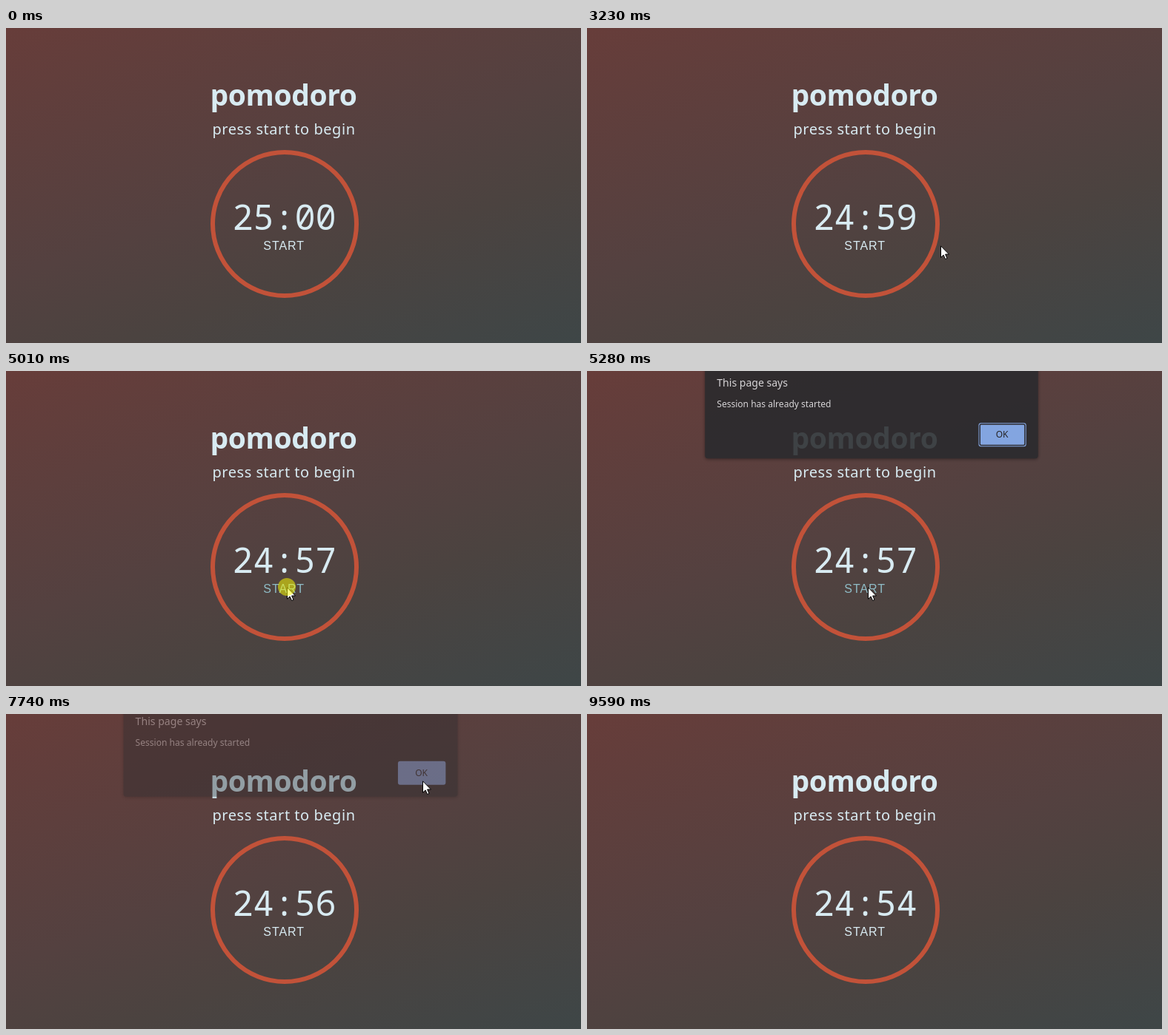
An HTML page for the animation above (9950 ms loop, 776 px wide and 426 px high).

```html
<!DOCTYPE html>
<html lang="en">
<head>
<meta charset="utf-8">
<title>pomodoro</title>
<style>
  html, body { margin: 0; width: 100%; height: 100%; overflow: hidden; }
  body {
    background: linear-gradient(160deg, #673d3a, #544140 48%, #4b4340 68%, #3e4647);
  }
  svg { display: block; width: 776px; height: 426px; }
  text { fill: #d8ebf2; font-family: "Noto Sans", "Open Sans", sans-serif; }
  .title { font-size: 39px; font-weight: 700; letter-spacing: -.4px; }
  .sub { font-size: 20px; letter-spacing: .53px; }
  .clock {
    font: 47px "Noto Sans Mono", "DejaVu Sans Mono", monospace;
    letter-spacing: -.2px;
  }
  .start { font: 16px "Liberation Sans", Arial, sans-serif; letter-spacing: .95px; }
  .dialog text { fill: #e8eaed; }
  .dialog .ok { fill: #202124; font-size: 12px; }
  .panel { filter: drop-shadow(0 1px 2px rgba(0, 0, 0, .45)); }
</style>
</head>
<body>
<svg viewBox="0 0 776 426">
  <text class="title" x="275.5" y="105">pomodoro</text>
  <text class="sub" x="278.5" y="144">press start to begin</text>
  <circle cx="376" cy="265" r="97" fill="none" stroke="#c25239" stroke-width="6"/>
  <text class="clock" id="clock" x="375.5" y="273" text-anchor="middle">25:00</text>
  <text class="start" id="start" x="347.3" y="300">START</text>

  <g class="dialog" id="dialog">
    <rect class="panel" x="160" y="-40" width="448" height="165" rx="4" fill="#292a2d"/>
    <text x="176" y="28" font-size="14">This page says</text>
    <text x="176" y="56" font-size="12">Session has already started</text>
    <rect id="button" x="528" y="77" width="64" height="32" rx="3" fill="#8ab4f8"/>
    <rect id="ring" x="529.75" y="78.75" width="60.5" height="28.5" rx="2"
          fill="none" stroke="#292a2d" stroke-width="1.5"/>
    <text class="ok" x="559.5" y="97" text-anchor="middle">OK</text>
  </g>

  <path id="cursor" d="M.5 .8V16.3L4.1 12.9 6.6 18.5 9 17.5 6.6 12H11.5Z"
        fill="#fff" stroke="#000"/>
  <circle id="ripple" r="12" fill="#ff0" fill-opacity=".52"/>
</svg>

<script>
const LOOP = 9950;
const $ = id => document.getElementById(id);
const [clock, start, dialog, button, ring, cursor, ripple] =
  ["clock", "start", "dialog", "button", "ring", "cursor", "ripple"].map($);

const ease = {
  in: p => p * p,
  out: p => 1 - (1 - p) ** 2,
  both: p => p * p * (3 - 2 * p),
  line: p => p
};

// time, x, y, easing on the way to this point
const path = [
  [130, 700, 426],
  [630, 379, 291, "out"],
  [2910, 379, 291, "line"],
  [3880, 762, 304, "both"],
  [4150, 659, 294, "in"],
  [4270, 621, 295, "out"],
  [4430, 621, 295, "line"],
  [4920, 379, 292, "both"],
  [5880, 379, 292, "line"],
  [6550, 543, 118, "both"],
  [6790, 562, 90, "out"],
  [7750, 562, 90, "line"],
  [8100, 573, 265, "both"],
  [8980, 573, 265, "line"],
  [9320, 721, 427, "in"]
];

const ticks = [
  [0, "25:00"], [2910, "24:59"], [3880, "24:58"], [4890, "24:57"],
  [7630, "24:56"], [8630, "24:55"], [9590, "24:54"]
];
const clicks = [1830, 4960, 7530];
const hovers = [[520, 2980], [4860, 7630]];

const between = (t, a, b) => t >= a && t < b;
const part = (t, a, b) => Math.min(1, Math.max(0, (t - a) / (b - a)));
const show = (el, on) => el.setAttribute("visibility", on ? "visible" : "hidden");

function pointer(t) {
  const i = path.findIndex(k => k[0] > t);
  if (i < 1) return null;
  const [t0, x0, y0] = path[i - 1];
  const [t1, x1, y1, kind] = path[i];
  const p = ease[kind]((t - t0) / (t1 - t0));
  return [x0 + (x1 - x0) * p, y0 + (y1 - y0) * p];
}

function drawDialog(t) {
  const open = 1 - part(t, 5080, 5340);
  const shut = part(t, 7630, 7830);
  const alpha = (1 - open ** 1.4) * (1 - shut ** .85);
  const lift = 30 * open + 24 * shut;
  const sx = 1 + lift * .0005;
  show(dialog, alpha > 0);
  dialog.setAttribute("opacity", alpha);
  dialog.setAttribute("transform",
    `translate(${384 * (1 - sx)} ${-lift}) scale(${sx} 1)`);
  const focused = t < 7630;
  ring.setAttribute("opacity", focused ? 1 : 0);
  button.setAttribute("fill", between(t, 6620, 7630) ? "#93baf9" : "#8ab4f8");
}

function draw(t) {
  clock.textContent = ticks.filter(k => k[0] <= t).pop()[1];
  start.style.fill = hovers.some(h => between(t, ...h)) ? "#8fbcc6" : "";
  drawDialog(t);

  const at = pointer(t);
  show(cursor, at);
  if (at) {
    const [x, y] = at.map(Math.round);
    cursor.setAttribute("transform", `translate(${x} ${y})`);
    ripple.setAttribute("transform", `translate(${x} ${y})`);
  }
  show(ripple, clicks.some(c => between(t, c, c + 70)));
}

const begin = performance.now();
function frame() {
  draw((performance.now() - begin) % LOOP);
  requestAnimationFrame(frame);
}
draw(0);
requestAnimationFrame(frame);
</script>
</body>
</html>
```
